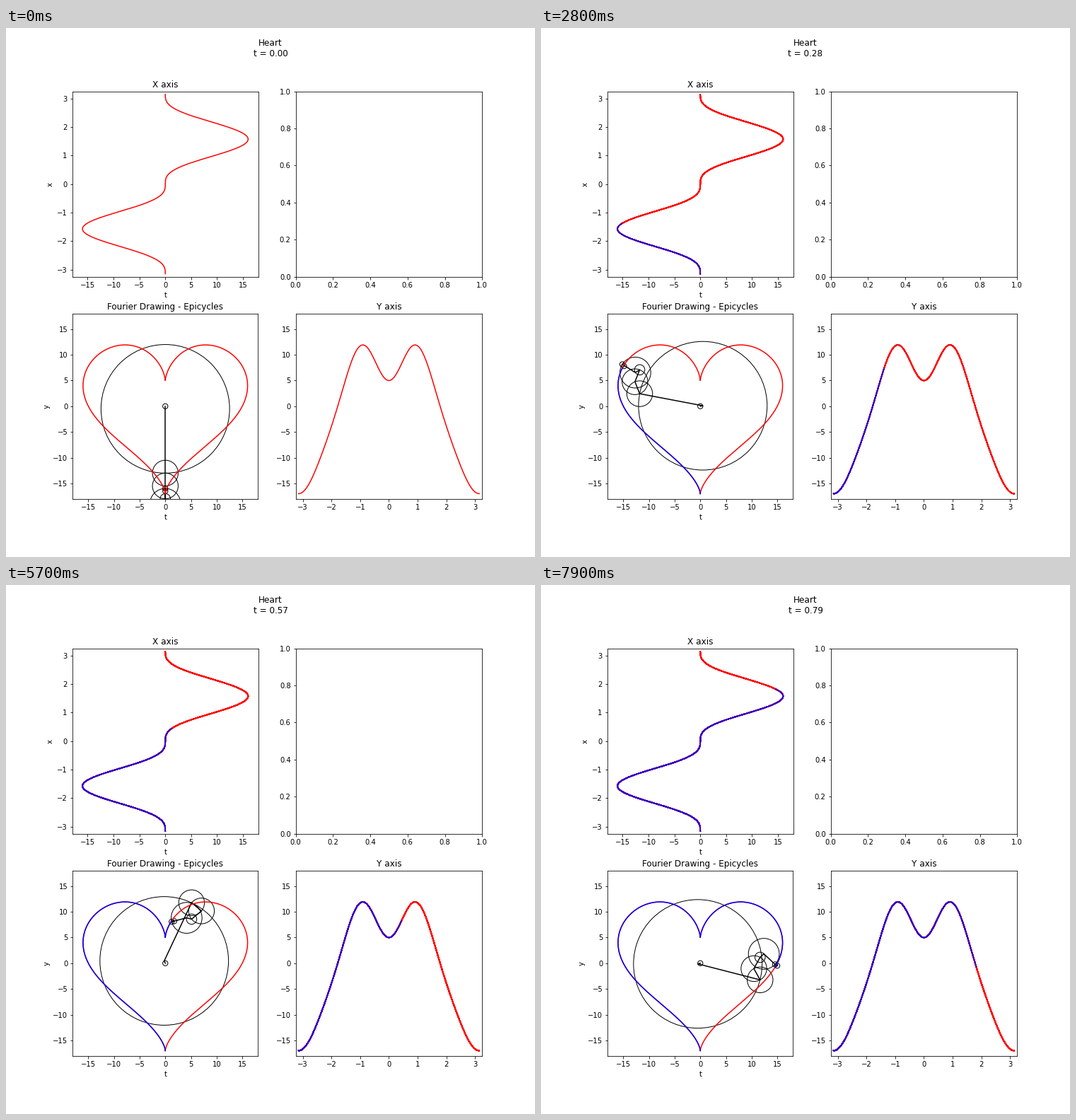
A matplotlib script that plays this animation: 748 by 748 pixels, repeating every 8000 ms.

```python
import numpy as np
import matplotlib.pyplot as plt
from matplotlib.animation import FuncAnimation

SIZE, DPI = 748, 72
FRAMES, INTERVAL = 80, 100
LIM, T_LIM = 18, np.pi + 0.1

# Fourier coefficients of the heart: z(t) = sum(c * exp(i n t))
ORDERS = np.array([1, -1, 2, -2, 3, -3, 4, -4])
COEFS = 1j * np.array([0.5, 12.5, -2.5, -2.5, 1, -3, -0.5, -0.5])


def arms(t):
    """Joints of the epicycle chain at angle t, starting at the origin."""
    return np.concatenate([[0], np.cumsum(COEFS * np.exp(1j * ORDERS * t))])


STEPS = 2
theta = np.linspace(-np.pi, np.pi, 100 * STEPS + 1)
heart = np.array([arms(t)[-1] for t in theta])
x, y = heart.real, heart.imag

plt.rcParams["font.family"] = "DejaVu Sans"
fig, ((ax_x, ax_empty), (ax_heart, ax_y)) = plt.subplots(
    2, 2, figsize=(SIZE / DPI, SIZE / DPI), dpi=DPI)
title = fig.suptitle("Heart\nt = 0.00")

ax_x.set(title="X axis", xlabel="t", ylabel="x",
         xlim=(-LIM, LIM), ylim=(-T_LIM, T_LIM))
ax_y.set(title="Y axis", xlim=(-T_LIM, T_LIM), ylim=(-LIM, LIM))
ax_heart.set(title="Fourier Drawing - Epicycles", xlabel="t", ylabel="y",
             xlim=(-LIM, LIM), ylim=(-LIM, LIM), aspect="equal")

# The side plots pile up one red and one blue curve per step.
layers = []
for k in range(FRAMES):
    n = k * STEPS + 1
    layers.append([
        *ax_x.plot(x, theta, "r"), *ax_x.plot(x[:n], theta[:n], "b"),
        *ax_y.plot(theta, y, "r"), *ax_y.plot(theta[:n], y[:n], "b"),
    ])

circles = [ax_heart.add_patch(plt.Circle((0, 0), abs(c), fill=False))
           for c in COEFS]
chain, = ax_heart.plot([], [], "k")
ax_heart.plot(x, y, "r")
trail, = ax_heart.plot([], [], "b")


def update(k):
    for i, layer in enumerate(layers):
        for line in layer:
            line.set_visible(i <= k)
    n = k * STEPS + 1
    joints = arms(theta[n - 1])
    for circle, p in zip(circles, joints):
        circle.center = p.real, p.imag
    chain.set_data(joints.real, joints.imag)
    trail.set_data(x[:n], y[:n])
    title.set_text(f"Heart\nt = {k / 100:.2f}")


anim = FuncAnimation(fig, update, frames=FRAMES, interval=INTERVAL,
                     init_func=lambda: update(0), repeat=True, repeat_delay=0)
plt.show()
```
